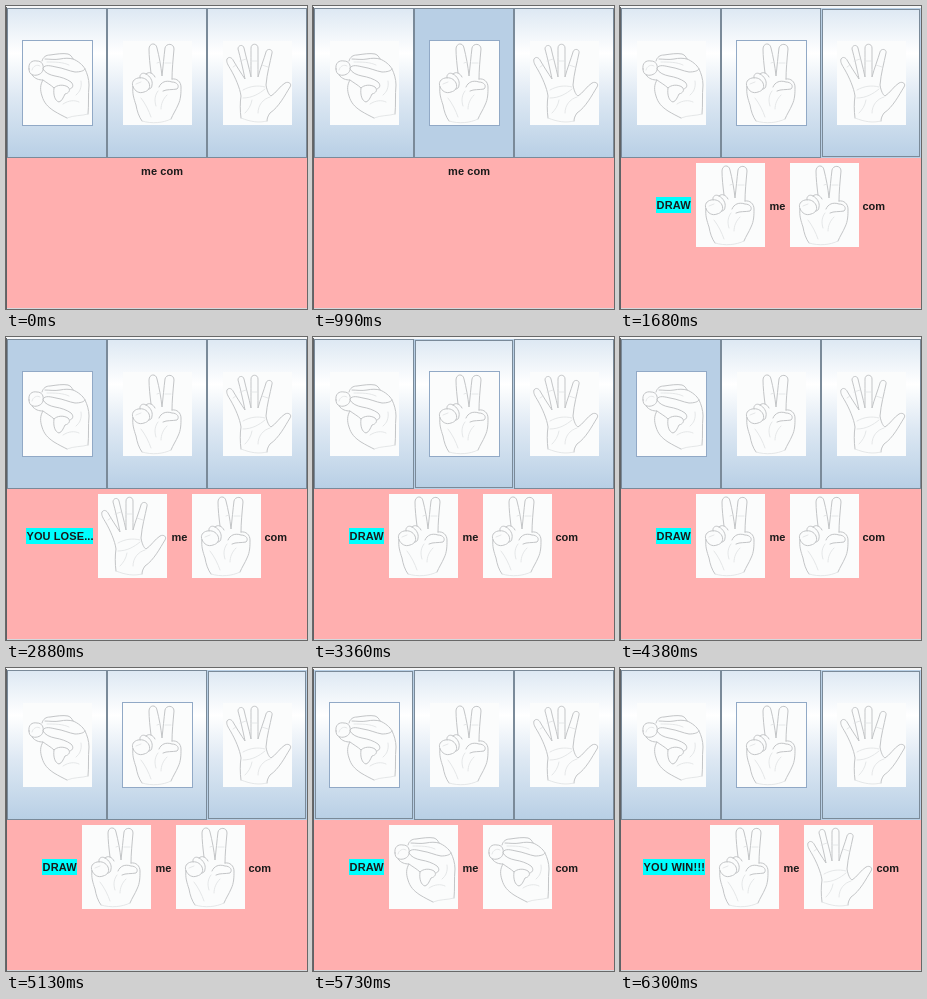
These frames come from a looping animation (301x303 px, 6.96 s). An HTML page:

```html
<!DOCTYPE html>
<html lang="en">
<head>
<meta charset="utf-8">
<title>Rock, scissors, paper</title>
<style>
  html, body { margin: 0; width: 100%; height: 100%; overflow: hidden; background: #ffafaf; }
  svg { display: block; width: 301px; height: 303px; }
  text { font: bold 11px "Liberation Sans", Arial, sans-serif; fill: #1a1a1a; }
  .hand path { fill: none; stroke: #c3c5c7; stroke-width: 1; stroke-linecap: round; stroke-linejoin: round; }
  .hand .fine { stroke: #dfe1e2; stroke-width: .8; }
</style>
</head>
<body>
<svg viewBox="0 0 301 303">
  <defs>
    <linearGradient id="ocean" x1="0" y1="0" x2="0" y2="1">
      <stop offset="0" stop-color="#dde8f3"/>
      <stop offset=".3" stop-color="#fff"/>
      <stop offset=".6" stop-color="#dde8f3"/>
      <stop offset="1" stop-color="#b8cfe5"/>
    </linearGradient>
    <g id="hand0" class="hand">
      <rect width="69" height="84" fill="#fbfcfc"/>
      <path d="M6 28C5 22 9 19 14 20C19 20 21 24 20 29C19 33 14 35 10 34C7 33 6 31 6 28Z"/>
      <path d="M19 20C20 16 23 14 27 14C34 13 40 12 45 13C48 14 49 16 50 18C55 20 60 24 62 28C64 32 66 38 66 44C65 54 66 64 65 73"/>
      <path d="M9 34C12 38 16 39 20 39C17 44 17 49 19 55C21 62 25 66 31 70C36 73 40 75 44 77"/>
      <path d="M20 27C22 23 28 25 33 26C40 27 46 30 52 31C57 31 61 30 62 28"/>
      <path d="M22 18C26 18 32 19 37 18C42 17 46 17 50 18"/>
      <path d="M20 28C22 32 27 34 32 35C38 36 44 38 48 41C51 44 50 47 47 48"/>
      <path d="M20 39C24 42 28 44 31 47C34 44 40 43 45 46C48 49 46 52 42 53C40 57 39 60 36 61C32 60 30 54 31 47"/>
      <path class="fine" d="M9 29C10 25 14 23 17 25M24 21C32 21 40 21 46 24M40 63C46 59 52 59 56 61M44 77C51 74 59 75 65 73M58 40C59 46 57 51 53 54"/>
    </g>
    <g id="hand1" class="hand">
      <rect width="69" height="84" fill="#fbfcfc"/>
      <path d="M28 32C27 24 26 15 26 8C26 2 33 1 34 7C36 15 38 25 39 35C40 26 41 15 42 7C43 2 51 2 51 8C50 19 49 29 49 38"/>
      <path d="M49 38C54 37 58 41 58 46C58 52 58 58 55 64C53 69 50 73 48 78"/>
      <path d="M10 46C8 41 11 38 15 37C20 36 24 38 26 42C28 47 25 50 21 51C16 53 12 50 10 46Z"/>
      <path d="M17 37C16 33 20 31 23 33C27 35 30 40 29 44C29 47 27 48 26 48"/>
      <path d="M23 33C26 30 30 32 32 36"/>
      <path d="M36 46C38 41 43 39 49 41C54 41 57 45 54 48C49 49 44 48 40 50"/>
      <path d="M10 46C9 52 11 58 13 64C14 70 16 76 19 80"/>
      <path class="fine" d="M35 50C32 54 31 59 33 65M18 57C22 62 26 70 28 76M34 22L37 21M42 22L48 22M13 43L18 41M44 54C40 58 38 63 38 68M19 80C29 83 40 82 48 78"/>
    </g>
    <g id="hand2" class="hand">
      <rect width="69" height="84" fill="#fbfcfc"/>
      <path d="M18 77C17 70 17 61 18 55C17 47 12 36 8 29C5 24 3 21 4 18C6 15 9 17 10 19C14 26 18 32 22 38C20 28 17 15 15 8C15 4 20 3 21 7C23 16 26 26 28 36C28 26 28 14 28 7C28 2 35 2 35 7C35 16 35 26 35 36C37 28 41 18 43 11C44 7 50 8 49 12C47 22 44 32 43 44C44 50 46 54 48 55C53 52 57 45 62 42C66 40 69 43 67 46C62 54 56 66 47 72C45 75 44 77 44 80"/>
      <path class="fine" d="M20 49C27 45 35 44 42 46M20 57C29 57 36 53 42 48M47 56C40 58 35 64 35 72M10 26L13 24M17 20L23 18M28 20L35 20M39 24L45 26M18 77C28 81 36 82 44 80M29 59C28 65 25 69 22 72"/>
    </g>
  </defs>
  <rect width="301" height="303" fill="#ffafaf"/>
  <rect width="301" height="2" fill="#f6f7f8"/>
  <g id="buttons"></g>
  <rect y="302" width="301" height="1" fill="#d4d8dc"/>
  <rect y="1" width="1" height="302" fill="#5f6266"/>
  <text id="idle" x="135" y="169" letter-spacing=".1">me com</text>
  <g id="result">
    <rect id="mark" y="191" height="16" fill="#0ff"/>
    <text id="verdict" y="203"></text>
    <use id="mine" y="157"/>
    <text id="me" y="204">me</text>
    <use id="theirs" y="157"/>
    <text id="com" y="204">com</text>
  </g>
</svg>
<script>
const LOOP = 6960;
const ROCK = 0, SCISSORS = 1, PAPER = 2;
const EDGE = '#7a8a99', GLOW = '#b8cfe5';
const $ = id => document.getElementById(id);

const VERDICTS = {
  draw: { label: 'DRAW', width: 35, x: 36, gap: 0.2 },
  lose: { label: 'YOU LOSE...', width: 67, x: 20, gap: 0.1 },
  win: { label: 'YOU WIN!!!', width: 62, x: 23, gap: 0.25 }
};

const hover = (t, button) => ({ t, hover: button });
const press = (t, button) => ({ t, pressed: button, focus: button });
const release = t => ({ t, pressed: -1 });
const show = (t, mine, theirs, verdict) => ({ t, pressed: -1, mine, theirs, verdict });

const START = { hover: -1, pressed: -1, focus: ROCK, verdict: null };
const EVENTS = [
  hover(420, PAPER), hover(660, SCISSORS),
  press(990, SCISSORS), release(1050), show(1080, SCISSORS, SCISSORS, 'draw'),
  hover(1680, PAPER),
  press(2220, PAPER), release(2310), show(2370, PAPER, SCISSORS, 'lose'),
  hover(2670, SCISSORS), hover(2760, ROCK),
  press(2880, ROCK), release(3000), show(3030, ROCK, ROCK, 'draw'),
  hover(3180, SCISSORS),
  press(3330, SCISSORS), show(3360, SCISSORS, SCISSORS, 'draw'),
  hover(3600, PAPER),
  press(3780, PAPER), show(3810, PAPER, PAPER, 'draw'),
  hover(3960, SCISSORS),
  press(4080, SCISSORS), show(4170, SCISSORS, SCISSORS, 'draw'),
  hover(4290, ROCK),
  press(4380, ROCK), release(4470), show(4530, ROCK, SCISSORS, 'win'),
  hover(4680, SCISSORS),
  press(4830, SCISSORS), release(4920), show(4950, SCISSORS, SCISSORS, 'draw'),
  hover(5130, PAPER),
  press(5220, PAPER), show(5250, PAPER, PAPER, 'draw'),
  hover(5430, SCISSORS), hover(5520, ROCK),
  press(5640, ROCK), show(5730, ROCK, ROCK, 'draw'),
  hover(5880, SCISSORS),
  press(6000, SCISSORS), release(6090), show(6120, SCISSORS, PAPER, 'win'),
  hover(6240, -1), hover(6300, PAPER)
];

function set(el, attrs) {
  for (const key in attrs) el.setAttribute(key, attrs[key]);
}

function add(parent, tag, attrs) {
  const el = document.createElementNS('http://www.w3.org/2000/svg', tag);
  set(el, attrs);
  parent.appendChild(el);
  return el;
}

const buttons = [ROCK, SCISSORS, PAPER].map(kind => {
  const g = add($('buttons'), 'g', { transform: `translate(${1 + kind * 100} 2)` });
  const face = add(g, 'rect', { x: .5, y: .5, width: 99, height: 149 });
  const ring = add(g, 'rect', { x: 1.5, y: 1.5, width: 97, height: 147, fill: 'none', stroke: EDGE });
  add(g, 'use', { href: '#hand' + kind, x: 16, y: 33 });
  const focus = add(g, 'rect', { x: 15.5, y: 32.5, width: 70, height: 85, fill: 'none', stroke: '#91a9c6' });
  return { face, ring, focus };
});

const visible = on => ({ visibility: on ? 'visible' : 'hidden' });

function render(t) {
  const state = Object.assign({}, START, ...EVENTS.filter(e => e.t <= t));
  buttons.forEach((b, kind) => {
    const down = state.pressed === kind;
    const lit = state.hover === kind && !down;
    set(b.face, { fill: down ? GLOW : 'url(#ocean)', stroke: lit ? GLOW : EDGE });
    set(b.ring, visible(lit));
    set(b.focus, visible(state.focus === kind));
  });

  const v = VERDICTS[state.verdict];
  set($('idle'), visible(!v));
  set($('result'), visible(v));
  if (!v) return;
  const x = v.x + v.width + 5;
  set($('mark'), { x: v.x, width: v.width });
  set($('verdict'), { x: v.x + .5, 'letter-spacing': v.gap });
  $('verdict').textContent = v.label;
  set($('mine'), { x, href: '#hand' + state.mine });
  set($('me'), { x: x + 73.5 });
  set($('theirs'), { x: x + 94, href: '#hand' + state.theirs });
  set($('com'), { x: x + 166.5 });
}

function tick() {
  render(performance.now() % LOOP);
  requestAnimationFrame(tick);
}
tick();
</script>
</body>
</html>
```
